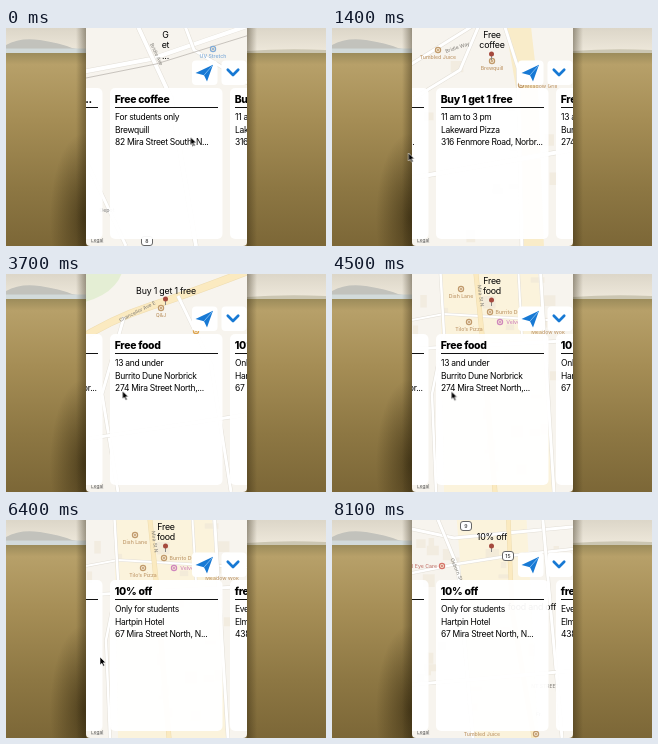
An HTML page for the animation above (8200 ms loop, 320 by 218 pixels).

```html
<!DOCTYPE html>
<html lang="en">
<head>
<meta charset="utf-8">
<title>Map deals</title>
<style>
  html, body { margin: 0; width: 100%; height: 100%; overflow: hidden; background: #a08a55; }
  svg { display: block; width: 100vw; height: 100vh; }
  text { font-family: Inter, "Open Sans", sans-serif; }
  .title { font-size: 10.4px; font-weight: 800; letter-spacing: -.26px; }
  .body { font-size: 8.5px; letter-spacing: -.3px; }
  .pin { font-size: 8.8px; letter-spacing: -.2px; text-anchor: middle; }
  .poi { font-size: 5.2px; font-weight: 500; text-anchor: middle; }
  .street { font-size: 5px; fill: #7d7a74; text-anchor: middle; }
  #camera, #track, #cursor, #touch, #fresh { animation: 8200ms linear infinite; }
  #camera { animation-name: camera; }
  #track { animation-name: swipe; }
  #cursor { animation-name: point; }
  #touch { animation-name: press; }
  #fresh { animation-name: load; }

  @keyframes camera {
    0%, 1.2% { transform: translate(0, 0); animation-timing-function: ease-in-out; }
    7.3%, 21.95% { transform: translate(40px, 260px); animation-timing-function: ease-in-out; }
    28.05%, 48.78% { transform: translate(-380px, 560px); animation-timing-function: ease-in-out; }
    54.88%, 81.71% { transform: translate(40px, 640px); animation-timing-function: ease-in-out; }
    87.8%, 100% { transform: translate(300px, 330px); }
  }
  @keyframes swipe {
    0%, 8.54% { transform: translateX(0); animation-timing-function: ease-in; }
    13.41% { transform: translateX(-100px); animation-timing-function: ease-out; }
    16.5%, 34.15% { transform: translateX(-120px); animation-timing-function: ease-in; }
    39.02% { transform: translateX(-188px); animation-timing-function: ease-out; }
    44.5%, 67.07% { transform: translateX(-240px); animation-timing-function: ease-in; }
    71.95% { transform: translateX(-328px); animation-timing-function: ease-out; }
    76.83%, 100% { transform: translateX(-360px); }
  }
  @keyframes point {
    0%, 7.32% { transform: translate(184.5px, 109px); opacity: 1; }
    8.54% { transform: translate(186px, 113px); animation-timing-function: ease-in; }
    13.41% { transform: translate(84px, 123px); animation-timing-function: ease-out; }
    17.07%, 21.95% { transform: translate(76.5px, 125px); animation-timing-function: ease-in-out; }
    29.27%, 34.15% { transform: translate(187.5px, 119px); animation-timing-function: ease-in; }
    39.02% { transform: translate(124px, 118px); animation-timing-function: ease-out; }
    43.9%, 53.66% { transform: translate(116.5px, 117px); animation-timing-function: ease-in-out; }
    62.2%, 67.07% { transform: translate(185px, 126px); animation-timing-function: ease-in; }
    71.95% { transform: translate(101px, 136px); animation-timing-function: ease-out; }
    78.05%, 86.5% { transform: translate(94px, 137px); opacity: 1; }
    86.6%, 100% { transform: translate(94px, 137px); opacity: 0; }
  }
  @keyframes press {
    0%, 8.5% { opacity: 0; }
    8.54%, 14% { opacity: 1; }
    14.02%, 34.1% { opacity: 0; }
    34.15%, 39.6% { opacity: 1; }
    39.63%, 65.8% { opacity: 0; }
    65.85%, 72.5% { opacity: 1; }
    72.56%, 100% { opacity: 0; }
  }
  @keyframes load {
    0%, 32% { opacity: .3; }
    37%, 100% { opacity: 1; }
  }
</style>
</head>
<body>
<svg viewBox="0 0 320 218" preserveAspectRatio="none">
  <defs>
    <linearGradient id="sky" x2="0" y2="1">
      <stop stop-color="#dcd6c8"/><stop offset="1" stop-color="#f0eadd"/>
    </linearGradient>
    <linearGradient id="field" x2="0" y2="1">
      <stop stop-color="#9c8c5b"/><stop offset=".06" stop-color="#b7a069"/>
      <stop offset=".35" stop-color="#a58d55"/><stop offset=".7" stop-color="#8d7743"/>
      <stop offset="1" stop-color="#7c6737"/>
    </linearGradient>
    <linearGradient id="shade">
      <stop stop-color="#2b210b" stop-opacity="0"/>
      <stop offset="1" stop-color="#2b210b" stop-opacity=".4"/>
    </linearGradient>
    <radialGradient id="hollow">
      <stop stop-color="#33270d" stop-opacity=".65"/>
      <stop offset="1" stop-color="#33270d" stop-opacity="0"/>
    </radialGradient>
    <clipPath id="screen"><path d="M80 0H241V214Q241 218 237 218H84Q80 218 80 214Z"/></clipPath>
  </defs>

  <rect width="320" height="27" fill="url(#sky)"/>
  <path d="M0 17Q14 9 34 12T66 20L82 23V25H0Z" fill="#c2c2bc"/>
  <rect y="20.5" width="80" height="4.5" fill="#d2dada"/>
  <path d="M240 23Q280 20 320 22V27H240Z" fill="#cbc6b2"/>
  <rect y="25" width="320" height="193" fill="url(#field)"/>
  <ellipse cx="78" cy="190" rx="34" ry="85" fill="url(#hollow)"/>
  <rect x="70" width="10" height="218" fill="url(#shade)"/>
  <rect x="241" width="10" height="218" fill="url(#shade)" transform="matrix(-1 0 0 1 492 0)"/>

  <g clip-path="url(#screen)">
    <rect x="80" width="161" height="218" fill="#f7f4ee"/>
    <g id="camera"></g>
    <g fill="#fff">
      <rect x="186" y="32.5" width="25.5" height="24.5" rx="4"/>
      <rect x="215.5" y="32.5" width="25" height="24.5" rx="4"/>
    </g>
    <path d="M189.5 45L207 36.8L201 53.5L198 47.2Z" fill="#1779d4"/>
    <path d="M206 38L198 47.2" stroke="#8fc4f5" stroke-width=".8"/>
    <path d="M221.8 41.8L227 47L232.2 41.8" fill="none" stroke="#1779d4" stroke-width="2.7" stroke-linecap="round" stroke-linejoin="round"/>
    <text x="85" y="213.8" font-size="4.8" fill="#555" text-decoration="underline">Legal</text>
    <g id="track"></g>
  </g>

  <g id="cursor">
    <circle id="touch" r="11" fill="#fff" fill-opacity=".25" stroke="#222" stroke-width="1.2"/>
    <path d="M0 0V8L1.9 6.3L3.2 9.2L4.6 8.6L3.3 5.8H5.8Z" fill="#000" stroke="#fff" stroke-width=".6"/>
  </g>
</svg>

<script>
const brown = '#c09a6c', gold = '#fbeac0', goldEdge = '#eedcb0';
const text = (cls, x, y, str, extra = '') => `<text class="${cls}" x="${x}" y="${y}" ${extra}>${str}</text>`;
const road = (d, width, color = '#fff', edge = '#e2ded6') =>
  `<g fill="none"><path d="${d}" stroke="${edge}" stroke-width="${width + 1}"/><path d="${d}" stroke="${color}" stroke-width="${width}"/></g>`;
const zone = (d, color = '#fbf3dc') => `<path d="${d}" fill="${color}"/>`;
const dot = (x, y, color, r = 2.5) => `<circle cx="${x}" cy="${y}" r="${r}" fill="${color}"/>`;
const ring = (x, y, color) => dot(x, y, color, 3.2) + dot(x, y, '#f4e6d0', 2) + dot(x, y, color, 1);
const poi = (x, y, str, color = brown, dx = 0, dy = 9) =>
  ring(x, y, color) + text('poi', x + dx, y + dy, str, `fill="${color}"`);
const street = (x, y, angle, str) => text('street', x, y, str, `transform="rotate(${angle} ${x} ${y})"`);
const shield = (x, y, str) =>
  `<rect x="${x - 5.5}" y="${y - 4.5}" width="11" height="9" rx="2.5" fill="#fff" stroke="#666"/>` +
  text('poi', x, y + 2, str, 'fill="#333"');
const pin = (y, lines, baseline) =>
  `<path d="M159.5 ${y}v6" stroke="#888"/>` + dot(159.5, y, '#a5493d') +
  lines.map((line, i) => text('pin', 160, baseline + i * 10, line)).join('');

// Faint building footprints from a small seeded generator
function blocks(seed, count) {
  const rand = () => (seed = (seed * 16807) % 2147483647) / 2147483647;
  let d = '';
  for (let i = 0; i < count; i++) {
    const x = 80 + rand() * 150, y = rand() * 205, w = 5 + rand() * 9, h = 4 + rand() * 9;
    d += `M${x.toFixed(1)} ${y.toFixed(1)}h${w.toFixed(1)}v${h.toFixed(1)}h${(-w).toFixed(1)}z`;
  }
  return `<path d="${d}" fill="#efe7d8" opacity=".6"/>`;
}

const scenes = [
  [0, 0,
    road('M60 47L145 31L250 -5', 4) + road('M128 -10L165 70L190 218', 4) + road('M60 90L120 218', 3) +
    road('M176 -10L188 22L250 60', 3) +
    `<path d="M70 52L150 36L250 5" fill="none" stroke="#bbb7b0" stroke-width=".8"/>` +
    street(149, 27, 65, 'Bridle Ave') + poi(207, 21, 'UV Stretch', '#7fabd9') +
    text('poi', 101, 184, 'Depot', 'fill="#888"') + shield(141, 213, '8') +
    ['G', 'et', '...'].map((s, i) => text('pin', 159.5, 10 + i * 10.3, s)).join('')],
  [-40, -260,
    zone('M172 -10H198L206 60L212 220H192L184 60Z', '#f9ecc9') + blocks(71, 14) +
    road('M65 45L150 -8', 3) + road('M74 75L128 42L150 -10', 3) +
    road('M170 -10L186 40L190 230', 3) + road('M80 150L250 120', 4) +
    street(126, 21, -18, 'Bridle Way') + poi(106, 22, 'Tumbled Juice') + poi(160, 33, 'Brewquill') +
    poi(189, 57, 'Meadow Grill', brown, 20, 3) + pin(26, ['Free', 'coffee'], 10)],
  [380, -560,
    zone('M70 -8H118Q112 22 70 30Z', '#e4eed4') +
    road('M66 70Q105 45 145 32T255 -8', 7, gold, goldEdge) + road('M172 22L205 90L225 218', 3) +
    road('M118 43L96 120L112 218', 3) + road('M80 165L245 140', 3) +
    street(132, 39, -27, 'Chancellor Ave E') + `<g id="fresh">${poi(155, 34, 'Q&amp;J')}</g>` +
    ring(190, 57, '#dda34d') + pin(25, ['Buy 1 get 1 free'], 19.5)],
  [-40, -640,
    zone('M108 -10H205L212 62L224 218H112Z') + blocks(937, 20) +
    road('M80 46L112 40L250 48', 2) + road('M80 75L250 66', 3) + road('M108 -10L112 60L100 120L104 218', 2.5) +
    road('M143 -10L150 60L164 230', 4, gold, goldEdge) + road('M186 -10L190 62', 2) + road('M208 -10L222 218', 3) +
    street(147, 22, 82, 'Mira St N') + poi(129, 15, 'Dish Lane') + poi(137, 48, 'Tilo’s Pizza') +
    poi(158, 38, 'Burrito Du', brown, 18, 2) + poi(168, 48, 'Velvet', '#cf86bd', 14, 2) +
    text('poi', 216, 60, 'Meadow Wok', `fill="${brown}"`) + pin(26, ['Free', 'food'], 10)],
  [-300, -330,
    zone('M124 -10H194L198 60L206 218H142Z') + blocks(4111, 20) +
    road('M75 8L122 18L250 6', 3) + road('M102 -10L126 48L142 230', 3) + road('M75 54L125 44L176 36L250 28', 2.5) +
    road('M176 -10L180 90L204 230', 3.5, gold, goldEdge) + road('M210 -10L230 218', 3) + road('M75 165L250 150', 3) +
    shield(134, 6, '9') + shield(176, 36, '15') + street(123, 50, 67, 'Osborn St') +
    ring(110, 46, '#d5726a') + text('poi', 91, 48, 'el Eye Care', 'fill="#c57c74"') +
    text('street', 213, 168, 'NT STREET') + text('street', 207, 196, 'Fr.') +
    ring(204, 214, brown) + text('poi', 150, 216, 'Tumbled Juice', `fill="${brown}"`) +
    text('pin', 200, 90, 'food and off') + pin(26, ['10% off'], 20)]
];

const deals = [
  ['Get a free day pas...', 'New members', 'UV Stretch', '70 Bridle Street East, t...'],
  ['Free coffee', 'For students only', 'Brewquill', '82 Mira Street South, N...'],
  ['Buy 1 get 1 free', '11 am to 3 pm', 'Lakeward Pizza', '316 Fenmore Road, Norbr...'],
  ['Free food', '13 and under', 'Burrito Dune Norbrick', '274 Mira Street North,...'],
  ['10% off', 'Only for students', 'Hartpin Hotel', '67 Mira Street North, N...'],
  ['free food and of...', 'Every weekend', 'Elmgrange', '438 Mira Street North,...']
];

const card = ([title, ...lines], i) => `<g transform="translate(${(i - 1) * 120 + 104} 60)">
  <rect width="112.5" height="151" rx="5" fill="#fff" fill-opacity=".95"/>
  ${text('title', 4.7, 15, title)}
  <path d="M5 19.5H108" stroke="#111" stroke-width="1.2"/>
  ${lines.map((line, n) => text('body', 5, 31.8 + n * 12.7, line)).join('')}</g>`;

document.getElementById('camera').innerHTML =
  scenes.map(([x, y, art]) => `<g transform="translate(${x} ${y})">${art}</g>`).join('');
document.getElementById('track').innerHTML = deals.map(card).join('');
</script>
</body>
</html>
```
